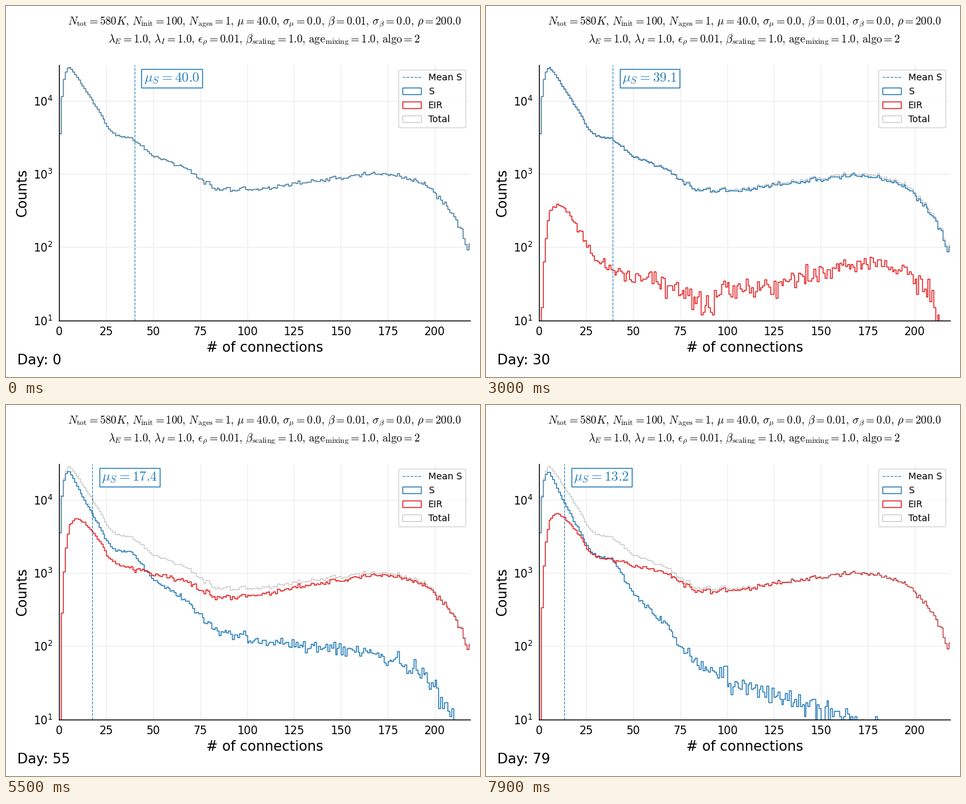
Write a matplotlib script that moves like this. It is 715x559 px and loops after 8000 ms.

```python
import numpy as np
import matplotlib.pyplot as plt
from matplotlib.animation import FuncAnimation
from matplotlib.lines import Line2D
from matplotlib.patches import Patch

W, H, DPI = 715, 559, 100
DAYS, BINS = 80, 219
BLUE, RED = "#1f77b4", "#e31a1c"

plt.rcParams["mathtext.fontset"] = "cm"
rng = np.random.default_rng(4)
k = np.arange(BINS + 1)
days = np.arange(DAYS)


def logistic(x):
    return 1 / (1 + np.exp(-x))


# People per number of connections: straight pieces in log10, steep rise at 0
knots = [(0, 4.48), (5, 4.48), (19, 3.93), (26, 3.61), (30, 3.53), (38, 3.5),
         (50, 3.24), (65, 3.11), (83, 2.78), (110, 2.81), (165, 3.01),
         (180, 2.98), (195, 2.86), (205, 2.585), (212, 2.33), (218, 1.95),
         (219, 2.2)]
log_n = np.interp(k, *zip(*knots)) - .94 * np.exp(-.8 * k)
total = rng.poisson(10 ** log_n)

# Infection hazard by degree, following a logistic epidemic in time
hazard = .7 * (1 - np.exp(-.042 * k ** 1.3)) + .083 * np.maximum(k - 40, 0) ** .8
delay = 1.45 * (1 - np.exp(-(k / 42) ** 2))
p_inf = 1 - np.exp(-hazard * logistic(.18 * (days[:, None] - 46) - delay))

# Each person has a fixed threshold, so counts only ever grow
infected = np.column_stack([
    np.searchsorted(np.sort(rng.random(n)), p)
    for n, p in zip(total, p_inf.T)])
healthy = total - infected

# Mean degree of those still susceptible
mean = 13.15 + 26.85 * logistic(.203 * (46.82 - days))

fig = plt.figure(figsize=(W / DPI, H / DPI), dpi=DPI, facecolor="white")
ax = fig.add_axes([80.4 / W, 85.4 / H, 620 / W, 385 / H])
ax.set_yscale("log")
ax.set_xlim(0, BINS)
ax.set_ylim(10, 10 ** 4.49)
ax.set_axisbelow(True)
ax.grid(color="#eeeeee", lw=1)
ax.tick_params(which="both", length=0, pad=7, labelsize=12)
ax.tick_params(axis="x", pad=6)
ax.spines[["top", "right"]].set_visible(False)
ax.spines[["left", "bottom"]].set_linewidth(1)
ax.set_xlabel("# of connections", fontsize=15)
ax.set_ylabel("Counts", fontsize=15)


def title(parts, baseline):
    fig.text(390 / W, 1 - baseline / H, "$" + r", \, ".join(parts) + "$",
             fontsize=12, ha="center", va="baseline")


title([r"N_\mathrm{tot} = 580K", r"N_\mathrm{init} = 100",
       r"N_\mathrm{ages} = 1", r"\mu = 40.0", r"\sigma_\mu = 0.0",
       r"\beta = 0.01", r"\sigma_\beta = 0.0", r"\rho = 200.0"], 29)
title([r"\lambda_E = 1.0", r"\lambda_I = 1.0", r"\epsilon_\rho = 0.01",
       r"\beta_\mathrm{scaling} = 1.0",
       r"\mathrm{age}_\mathrm{mixing} = 1.0", r"\mathrm{algo} = 2"], 55)


def visible(counts):
    return np.maximum(counts[:BINS], .5)


def outline(counts, **style):
    edges = np.arange(len(counts) + 1)
    return ax.stairs(counts, edges, baseline=None, **style)


s_style = dict(color=BLUE, lw=1)
e_style = dict(color=RED, lw=1)
t_style = dict(color="gray", lw=.5, alpha=.7)
m_style = dict(color=BLUE, lw=.8, ls="--", alpha=.9)

s_line = outline(visible(healthy[0]), **s_style)
e_line = outline(visible(infected[0]), **e_style)
outline(total, **t_style)
m_line = ax.axvline(mean[0], **m_style)


def box(label, color, **style):
    return Patch(facecolor="none", edgecolor=color, label=label, **style)


ax.legend(handles=[Line2D([], [], label="Mean S", **m_style),
                   box("S", **s_style), box("EIR", **e_style),
                   box("Total", **t_style)],
          loc="upper right", fontsize=10)

m_text = ax.text(0, .976, "", transform=ax.get_xaxis_transform(), fontsize=15,
                 color=BLUE, va="top", alpha=.95,
                 bbox=dict(facecolor="white", edgecolor=BLUE, pad=2.4, lw=1))
day_text = fig.text(17 / W, 19 / H, "", fontsize=15, va="baseline")


def update(day):
    s_line.set_data(visible(healthy[day]))
    e_line.set_data(visible(infected[day]))
    mu = mean[day]
    m_line.set_xdata([mu, mu])
    m_text.set_x(mu + 5)
    m_text.set_text(rf"$\mu_S = {mu:.1f}$")
    day_text.set_text(f"Day: {day}")
    return s_line, e_line, m_line, m_text, day_text


anim = FuncAnimation(fig, update, frames=DAYS, interval=100, repeat=True,
                     repeat_delay=0, blit=False)
plt.show()
```
